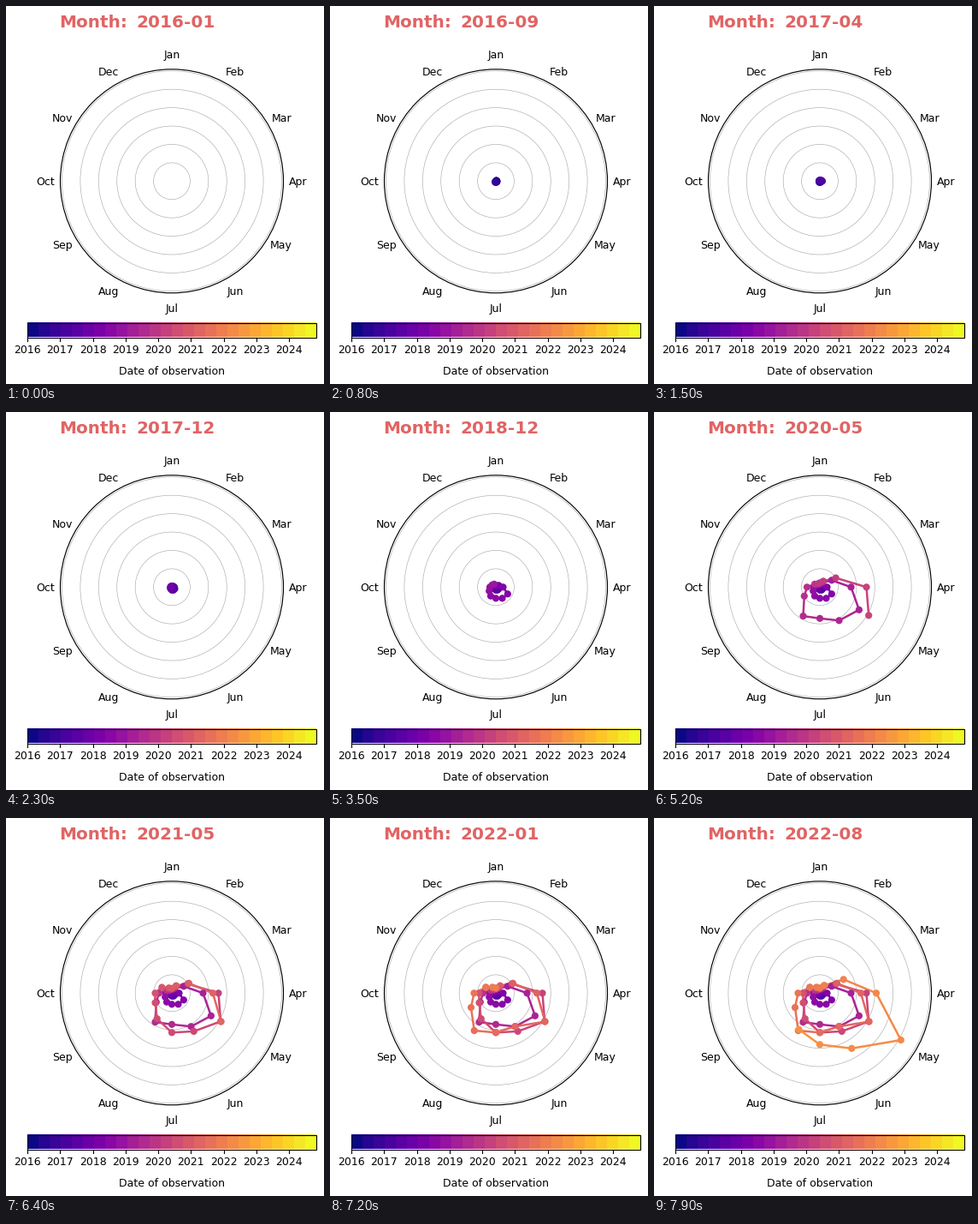
A matplotlib script that plays this animation: 372 by 441 pixels, repeating every 8 s.

```python
import numpy as np
import matplotlib.pyplot as plt
from matplotlib.animation import FuncAnimation
from matplotlib.collections import LineCollection
from matplotlib.patches import Circle, Rectangle

W, H, DPI = 372, 441, 100
PX = 72 / DPI  # points per pixel
CX, CY = 194, 204.3
FIRST_YEAR, SPAN = 2016, 106 / 12
MONTHS = "Jan Feb Mar Apr May Jun Jul Aug Sep Oct Nov Dec".split()

# Monthly radii in pixels, one row per year
RADII = np.concatenate([
    [np.nan, 1, 1, 1.5, 1.5, 1.5, 1.5, 1.5, 1, 1, 1, 1],
    [1, 1, 2, 3, 4, 4, 3.5, 2.5, 2, 1.5, 1.5, 1],
    [1.5, 2, 4, 8.5, 16, 15, 13, 12, 9, 7, 5, 4],
    [4, 6, 16, 36.5, 53, 45, 36.5, 39, 21, 15, 7, 4.5],
    [5, 8, 21.5, 54.5, 66, 51.5, 46, 34.5, 22.5, 19.5, 13.5, 7],
    [5.5, 10, 23, 48, 66.5, 45, 46, 50.5, 33.5, 25.5, 13.5, 8],
    [6, 10.5, 32, 66, 109.5, 74.5, 60, 49],
])
N = len(RADII)


def polar(r, month):
    a = np.asarray(month) * np.pi / 6
    return CX + r * np.sin(a), CY - r * np.cos(a)


def label(x, y, s, **kw):
    opts = dict(fontsize=12.5 * PX, ha="center", va="baseline", color="black")
    return ax.text(x, y + 4.6, s, **{**opts, **kw})


plt.rcParams["font.family"] = "DejaVu Sans"
fig = plt.figure(figsize=(W / DPI, H / DPI), dpi=DPI, facecolor="white")
ax = fig.add_axes([0, 0, 1, 1])
ax.set(xlim=(0, W), ylim=(H, 0))
ax.axis("off")

# Polar frame
for k in range(1, 7):
    ax.add_patch(Circle((CX, CY), 21.42 * k, fill=False, ec="#a8a8a8", lw=0.6 * PX))
ax.add_patch(Circle((CX, CY), 130.5, fill=False, ec="black", lw=1.15 * PX))
for m, name in enumerate(MONTHS):
    label(*polar(148, m), name)

# Colour bar
X0, X1, Y0, Y1 = 25, 363, 370, 386.5
cmap = plt.get_cmap("plasma")
ax.imshow(np.linspace(0, 1, 26)[None], cmap=cmap, extent=(X0, X1, Y1, Y0),
          aspect="auto", interpolation="nearest")
ax.set(xlim=(0, W), ylim=(H, 0))
ax.add_patch(Rectangle((X0, Y0), X1 - X0, Y1 - Y0, fill=False, ec="black", lw=1.15 * PX))
for k in range(9):
    x = X0 + (X1 - X0) * k / SPAN
    ax.plot([x, x], [Y1, Y1 + 4.9], color="black", lw=1.1 * PX)
    label(x, 400.8, str(FIRST_YEAR + k))
label(194, 425.2, "Date of observation")

# Title
head = dict(fontsize=20 * PX, weight="bold", color="#e06464", ha="left")
label(62.5, 20.7, "Month:", **head)
date = label(152, 20.7, "", **head)

# Spiral
idx = np.arange(N)
pts = np.column_stack(polar(RADII, idx))
segs = np.stack([pts[:-1], pts[1:]], axis=1)
colors = cmap(idx / 12 / SPAN)
lines = ax.add_collection(LineCollection([], linewidths=2.5 * PX, capstyle="round", zorder=3))
dots = ax.scatter([], [], s=(8.2 * PX) ** 2, linewidths=0, zorder=4)


def update(i):
    date.set_text(f"{FIRST_YEAR + i // 12}-{i % 12 + 1:02d}")
    lines.set_segments(segs[:i])
    lines.set_color(colors[1:i + 1])
    dots.set_offsets(pts[:i + 1])
    dots.set_facecolor(colors[:i + 1])
    return date, lines, dots


anim = FuncAnimation(fig, update, frames=N, interval=100, repeat=True, repeat_delay=0)
plt.show()
```
